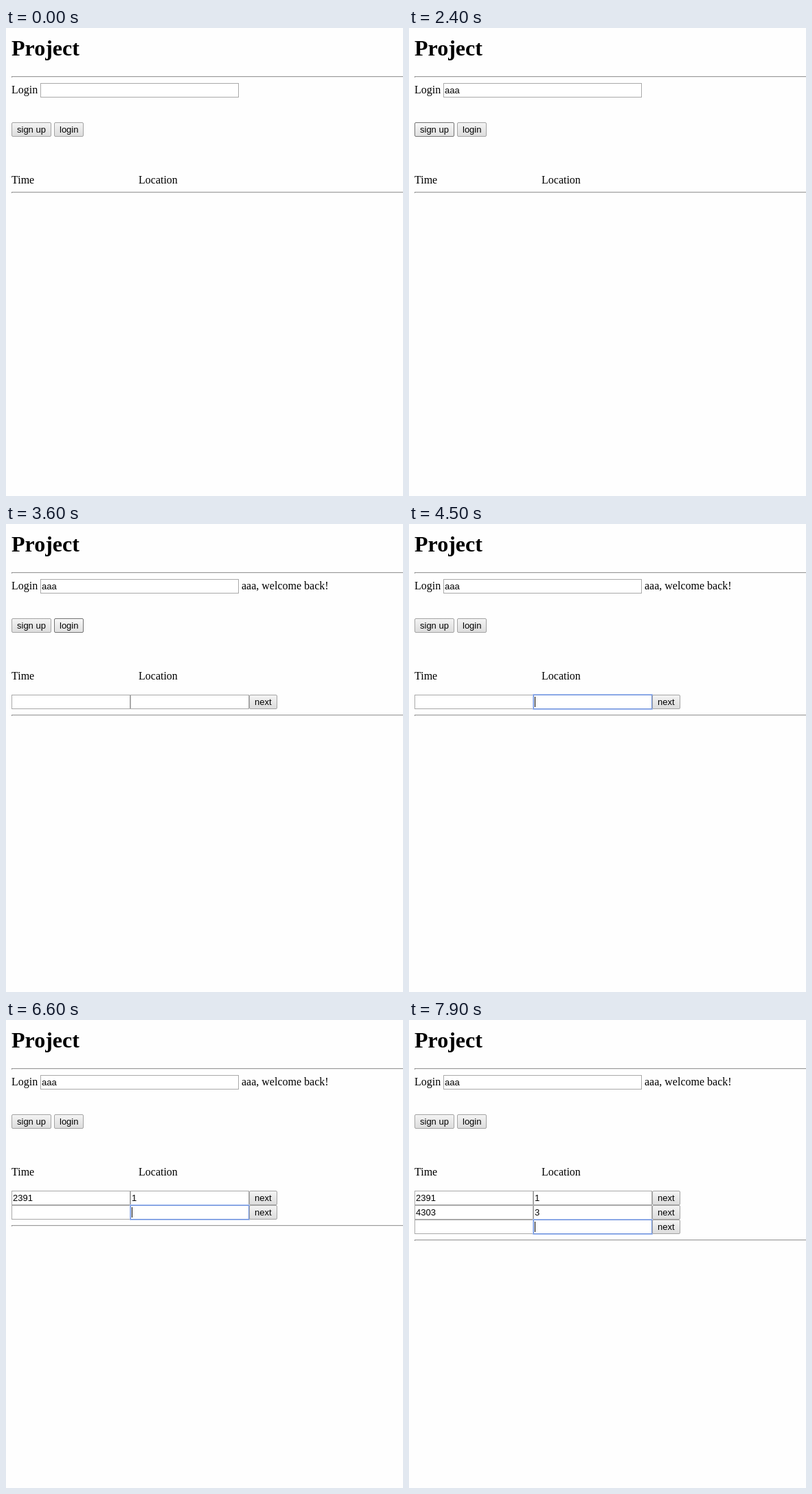
Animation, 578 px wide and 680 px high, one loop 8000 ms. Source, as an HTML page:

```html
<!DOCTYPE html>
<html lang="en">
<head>
<meta charset="utf-8">
<title>Login form</title>
<style>
  html, body { margin: 0; width: 100%; height: 100%; overflow: hidden; background: #fefefe; }
  svg { display: block; }
  rect, path { shape-rendering: crispEdges; }
  text { white-space: pre; }
  .page { font: 16px "Liberation Serif", "Times New Roman", serif; }
  .title { font: bold 32px "Liberation Serif", "Times New Roman", serif; }
  .ui { font: 13px "Liberation Sans", Arial, sans-serif; }
</style>
</head>
<body>
<svg width="578" height="680" viewBox="0 0 578 680">
  <defs>
    <linearGradient id="idle" x2="0" y2="1"><stop stop-color="#f4f4f4"/><stop offset="1" stop-color="#dcdcdc"/></linearGradient>
    <linearGradient id="hover" x2="0" y2="1"><stop stop-color="#f8f8f8"/><stop offset="1" stop-color="#e0e0e0"/></linearGradient>
    <linearGradient id="press" x2="0" y2="1"><stop stop-color="#d8d8d8"/><stop offset="1" stop-color="#f0f0f0"/></linearGradient>
  </defs>
  <g id="stage"></g>
</svg>
<script>
const LOOP = 8000;
const ROW_TOP = 248, ROW_HEIGHT = 21, DIGIT = 7;

// Each step changes part of the state from its time on.
const steps = [
  [0, { name: '', focus: null, caret: true, hover: null, press: null, ime: 0, welcome: false, rows: [] }],
  [800, { focus: 'name' }],
  [1000, { hover: 'sign up' }],
  [1100, { ime: 1 }],
  [1200, { ime: 2 }],
  [1500, { ime: 1 }],
  [1600, { ime: 0 }],
  [1700, { name: 'a' }],
  [1900, { name: 'aa' }],
  [2000, { name: 'aaa' }],
  [2400, { focus: null }],
  [2500, { press: 'sign up' }],
  [2600, { press: null, welcome: true }],
  [2800, { hover: null }],
  [2900, { hover: 'login' }],
  [3500, { press: 'login' }],
  [3600, { press: null, rows: [['', '']] }],
  [4100, { hover: null }],
  [4500, { focus: 'row0' }],
  [5000, { caret: false }],
  [5100, { caret: true, rows: [['', '1']] }],
  [5400, { hover: 'next0' }],
  [5600, { focus: null }],
  [5700, { press: 'next0' }],
  [5800, { press: null, rows: [['2391', '1'], ['', '']] }],
  [6100, { hover: null }],
  [6600, { focus: 'row1' }],
  [7000, { hover: 'next1', rows: [['2391', '1'], ['', '3']] }],
  [7400, { focus: null }],
  [7500, { press: 'next1' }],
  [7600, { press: null, hover: null, rows: [['2391', '1'], ['4303', '3'], ['', '']] }],
  [7900, { focus: 'row2' }]
];

const box = (x, y, w, h, fill) => `<rect x="${x}" y="${y}" width="${w}" height="${h}" fill="${fill}"/>`;
const text = (x, y, str, cls = 'page') => `<text x="${x}" y="${y}" class="${cls}">${str}</text>`;
const rule = y => box(8, y, 570, 2, '#eee') + box(8, y, 570, 1, '#9a9a9a') + box(8, y, 1, 2, '#9a9a9a');

function field(x, y, w, value, focused, caret) {
  const ring = focused ? box(x - 1, y - 1, w + 2, 23, '#a9c0f0') : '';
  const bar = focused && caret ? box(x + 2 + DIGIT * value.length, y + 3, 1, 15, '#000') : '';
  return ring + box(x, y, w, 21, focused ? '#6c90dc' : '#a9a9a9') +
    box(x + 1, y + 1, w - 2, 19, '#fff') + text(x + 2, y + 15, value, 'ui') + bar;
}

function button(x, y, w, label, id, s) {
  const mode = s.press === id ? 'press' : s.hover === id ? 'hover' : 'idle';
  const edge = mode === 'idle' ? '#a3a3a3' : mode === 'hover' ? '#737373' : '#8c8c8c';
  return `<rect x="${x + .5}" y="${y + .5}" width="${w - 1}" height="20" rx="1.5" fill="url(#${mode})"
    stroke="${edge}" style="shape-rendering:auto"/>` + text(x + 8, y + 15, label, 'ui');
}

function inputPopup(level) {
  const underline = box(53, 96, 11, 1, '#000') + box(54, 95, 9, 1, '#000');
  if (level < 2) return level ? underline : '';
  return underline + box(52, 97, 19, 53, '#000') + box(52, 97, 17, 52, '#808000') +
    box(53, 98, 16, 50, '#fff') + box(53, 97, 16, 1, '#808080') +
    '<path d="M57.5 110V101.5H65.5V110" fill="none" stroke="#000"/>';
}

function row([time, place], i, s) {
  const y = ROW_TOP + i * ROW_HEIGHT;
  return field(8, y, 173, time) + field(181, y, 173, place, s.focus === 'row' + i, s.caret) +
    button(354, y, 41, 'next', 'next' + i, s);
}

function draw(s) {
  const count = s.rows.length;
  return text(8, 40, 'Project', 'title') + rule(70) +
    text(8, 95, 'Login') + field(50, 80, 289, s.name, s.focus === 'name', s.caret) +
    (s.welcome ? text(343, 95, 'aaa, welcome back!') : '') +
    button(8, 137, 58, 'sign up', 'sign up', s) + button(70, 137, 43, 'login', 'login', s) +
    inputPopup(s.ime) +
    text(8, 226, 'Time') + text(193, 226, 'Location') +
    s.rows.map((r, i) => row(r, i, s)).join('') +
    rule(count ? ROW_TOP + count * ROW_HEIGHT + 8 : 238);
}

const stage = document.getElementById('stage');
let shown = -1;

function tick() {
  const t = performance.now() % LOOP;
  const past = steps.filter(([at]) => at <= t);
  if (past.length !== shown) {
    shown = past.length;
    stage.innerHTML = draw(Object.assign({}, ...past.map(([, change]) => change)));
  }
  requestAnimationFrame(tick);
}
tick();
</script>
</body>
</html>
```
